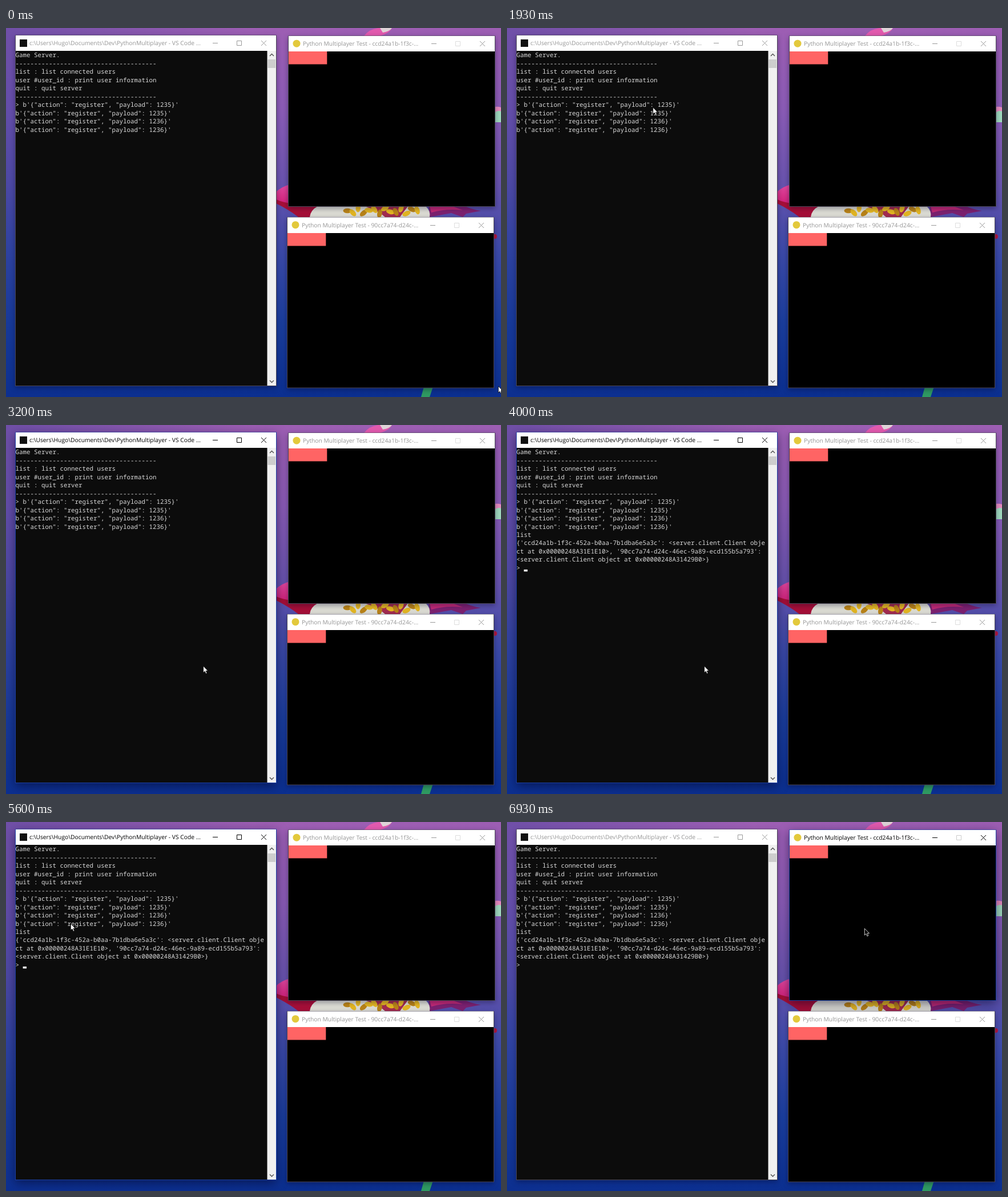
Write an HTML page that moves like this. It is 867 px wide and 646 px high and loops after 8000 ms.

```html
<!DOCTYPE html>
<html lang="en">
<head>
<meta charset="utf-8">
<title>Game server</title>
<style>
html, body { margin: 0; width: 100%; height: 100%; overflow: hidden; background: #3a4aa5; }
svg { display: block; width: 867px; height: 646px; text-rendering: geometricPrecision; }
.mono { font: 10.83px "Noto Sans Mono", "DejaVu Sans Mono", monospace; fill: #dadada; }
.title { font: 10.3px "Open Sans", "Noto Sans", sans-serif; fill: #959595; }
.btn { fill: none; stroke: #999; stroke-width: 1; }
.edge { fill: #4a4756; }
.win { filter: drop-shadow(0 3px 5px rgba(0, 0, 30, .35)); }
.win.on { filter: drop-shadow(0 5px 9px rgba(0, 0, 30, .5)); }
.on .title { fill: #000; }
.on .btn { stroke: #000; }
.on .edge { fill: #1b40a6; }
.win .off { stroke: #ddd; }
.on .off { stroke: #ccc; }
</style>
</head>
<body>
<svg id="stage" viewBox="0 0 867 646">
  <defs>
    <linearGradient id="sky" x1="0" y1="0" x2="0" y2="1">
      <stop offset="0" stop-color="#9d5eb3"/>
      <stop offset=".22" stop-color="#8a5bb5"/>
      <stop offset=".42" stop-color="#6853ad"/>
      <stop offset=".6" stop-color="#3d4aa8"/>
      <stop offset=".8" stop-color="#1a3d9c"/>
      <stop offset="1" stop-color="#0b2f90"/>
    </linearGradient>
    <linearGradient id="side">
      <stop offset="0" stop-color="#10308f" stop-opacity=".32"/>
      <stop offset=".5" stop-color="#10308f" stop-opacity="0"/>
    </linearGradient>
    <linearGradient id="petal" x1="0" y1="0" x2="0" y2="1">
      <stop offset="0" stop-color="#e0489f"/>
      <stop offset="1" stop-color="#cf1f78"/>
    </linearGradient>
  </defs>
  <rect width="867" height="646" fill="url(#sky)"/>
  <rect width="867" height="646" fill="url(#side)"/>
  <g id="flower">
    <path d="M627 14Q636 2 652 0H676Q672 9 655 14Z" fill="#e25aae"/>
    <path d="M655 0H676Q672 6 660 8Z" fill="#dfd3d8"/>
    <path d="M473 287Q482 278 497 274L530 300L497 310L473 302Z" fill="url(#petal)"/>
    <path d="M473 300Q490 309 548 311L532 331H512Q497 319 473 307Z" fill="#a60f38"/>
    <path d="M740 308H795Q815 318 832 320L806 325L800 331L780 324L742 331Z" fill="#7c2170"/>
    <path d="M742 312H782L800 319Q770 316 745 323Z" fill="#c22a76"/>
    <path d="M532 331Q533 319 546 312H735Q744 320 742 331Z" fill="#dcdcd4"/>
    <path d="M628 312H704L690 331H664Q652 320 628 312Z" fill="#a32c50"/>
    <g id="anthers"/>
    <path d="M856 138Q862 137 867 139V151H856Z" fill="#e58bbd"/>
    <path d="M856 148Q862 143 867 146V165H856Z" fill="#9fd8bd"/>
    <circle cx="856" cy="365" r="4" fill="#b5183f"/>
    <path d="M732 628H748L742 646H727Z" fill="#2f9a62"/>
  </g>
</svg>
<script>
const stage = document.getElementById("stage");

function el(tag, attrs, parent = stage, text) {
  const node = document.createElementNS("http://www.w3.org/2000/svg", tag);
  for (const k in attrs) node.setAttribute(k, attrs[k]);
  if (text) node.textContent = text;
  parent.append(node);
  return node;
}

function rect(x, y, width, height, fill, parent) {
  return el("rect", { x, y, width, height, fill }, parent);
}

const anthers = document.getElementById("anthers");
for (let i = 0; i < 14; i++) {
  const x = 598 + i * 9.4, y = 320 + 5 * Math.sin(i * 2.4);
  el("ellipse", { cx: x, cy: y, rx: 7.5, ry: 4.2, transform: `rotate(${i * 47} ${x} ${y})`,
    fill: i % 3 ? "#e3b622" : "#b98318" }, anthers);
}

function makeWindow(x, y, w, h, title, tx, body, fixed) {
  const g = el("g", { class: "win" }), r = x + w;
  const cy = Math.round(y + 13) + .5, top = Math.round(y + 27.4);
  el("rect", { x: x - 1, y: y - .5, width: w + 2, height: h + 1.5, class: "edge" }, g);
  rect(x, y, w, 28, "#fff", g);
  rect(x, top, w, y + h - top, body, g);
  el("text", { x: x + tx, y: y + 17.3, class: "title" }, g, title);
  const btn = (d, c = "") => el("path", { d, class: "btn " + c }, g);
  btn(`M${r - 111} ${cy}h9`);
  btn(`M${r - 68.5} ${cy - 4}h8v8h-8z`, fixed ? "off" : "");
  btn(`M${r - 26} ${cy - 4.5}l9 9m0 -9l-9 9`);
  return g;
}

function makeGame(x, y, id) {
  const g = makeWindow(x, y, 361, 298, `Python Multiplayer Test - ${id}-...`, 25, "#000", true);
  el("circle", { cx: x + 14, cy: y + 13.2, r: 6.5, fill: "#e3c93c" }, g);
  rect(x, Math.round(y + 27.4), 67.3, 22.5, "#ff6464", g);
  return g;
}

const shell = makeWindow(17, 13, 456, 613,
  "c:\\Users\\Hugo\\Documents\\Dev\\PythonMultiplayer - VS Code ...", 24, "#0c0c0c");
rect(24, 20, 13, 13, "#111", shell);
rect(457.5, 40, 15.5, 586, "#f0f0f0", shell);
rect(458.5, 55, 13.5, 15, "#cdcdcd", shell);
for (const d of ["M462 49l3.5 -3.5l3.5 3.5", "M462 617l3.5 3.5l3.5 -3.5"])
  el("path", { d, fill: "none", stroke: "#505050", "stroke-width": 1.4 }, shell);

const gameA = makeGame(495, 14, "ccd24a1b-1f3c");
makeGame(493, 331.5, "90cc7a74-d24c");

const CHAR = 6.5, ROW = 14.46;
const line = (text, row) =>
  el("text", { x: 16.6, y: 51.4 + row * ROW, class: "mono" }, shell, text);
const rule = "-".repeat(38);
const register = n => `b'{"action": "register", "payload": ${n}}'`;

["Game Server.", rule, "list : list connected users", "user #user_id : print user information",
  "quit : quit server", rule, "> " + register(1235), register(1235), register(1236), register(1236)
].forEach(line);

const typed = line("", 10);
const reply = [
  "{'ccd24a1b-1f3c-452a-b0aa-7b1dba6e5a3c': <server.client.Client obje",
  "ct at 0x00000248A31E1E10>, '90cc7a74-d24c-46ec-9a89-ecd155b5a793':",
  "<server.client.Client object at 0x00000248A31429B0>}",
  ">"
].map((text, i) => line(text, 11 + i));
const caret = rect(0, 0, 6.4, 3.5, "#f2f2f2", shell);

const pointer = el("path", { d: "M0 0V11.6L2.7 9.2L4.6 13.4L6.5 12.5L4.7 8.4H8.2Z",
  "stroke-width": .8, "stroke-linejoin": "round" });

// All times below are ticks of 1/15 s.
const TICK = 1000 / 15, LOOP = 120;

// [tick, x, y] of the pointer tip
const path = [
  [0, 862.3, 627], [15, 862.3, 627], [16, 864.6, 624], [17, 900, 600], [24, 900, 600],
  [25, 761, 344], [29, 255.7, 139], [39, 255.7, 139], [40, 318, 355], [41, 345.6, 422],
  [75, 345.6, 422], [84, 113.3, 178], [87, 113.3, 178], [92, 213, 186.5],
  [96, 213, 186.5], [100, 626.3, 186.5], [LOOP, 626.3, 186.5]
];

// [from, to, column, row] while the caret shows
const carets = [
  [40, 48, 0, 10], [53, 54, 1, 10], [54, 55, 3, 10], [55, 56, 4, 10],
  [60, 72, 2, 14], [80, 88, 2, 14], [96, 104, 2, 14]
];

// [tick, letters typed]
const keys = [[53, 1], [54, 3], [55, 4]];

function pointerAt(n) {
  let i = path.findIndex(p => p[0] > n);
  if (i < 0) i = path.length - 1;
  const [t0, x0, y0] = path[i - 1], [t1, x1, y1] = path[i];
  const p = (n - t0) / (t1 - t0), e = p * p * (3 - 2 * p);
  return [x0 + (x1 - x0) * e, y0 + (y1 - y0) * e];
}

function show(node, on) {
  node.setAttribute("visibility", on ? "visible" : "hidden");
}

function draw(n) {
  shell.classList.toggle("on", n >= 32 && n < 104);
  gameA.classList.toggle("on", n >= 104);

  const count = keys.reduce((c, [t, k]) => n >= t ? k : c, 0);
  typed.textContent = "list".slice(0, count);
  reply.forEach(r => show(r, n >= 60));

  const c = carets.find(([a, b]) => n >= a && n < b);
  show(caret, c);
  if (c) {
    caret.setAttribute("x", 16.6 + c[2] * CHAR);
    caret.setAttribute("y", 253 + (c[3] - 14) * ROW);
  }

  const [x, y] = pointerAt(n);
  const inGame = x > 494 && x < 856 && (y > 41 && y < 312 || y > 359 && y < 630);
  pointer.setAttribute("transform", `translate(${x} ${y})`);
  pointer.setAttribute("fill", inGame ? "#000" : "#fff");
  pointer.setAttribute("stroke", inGame ? "#fff" : "#000");
}

const start = performance.now();
let last = -1;
function loop() {
  const n = Math.floor((performance.now() - start + 4) / TICK) % LOOP;
  if (n !== last) draw(last = n);
  requestAnimationFrame(loop);
}
loop();
</script>
</body>
</html>
```
